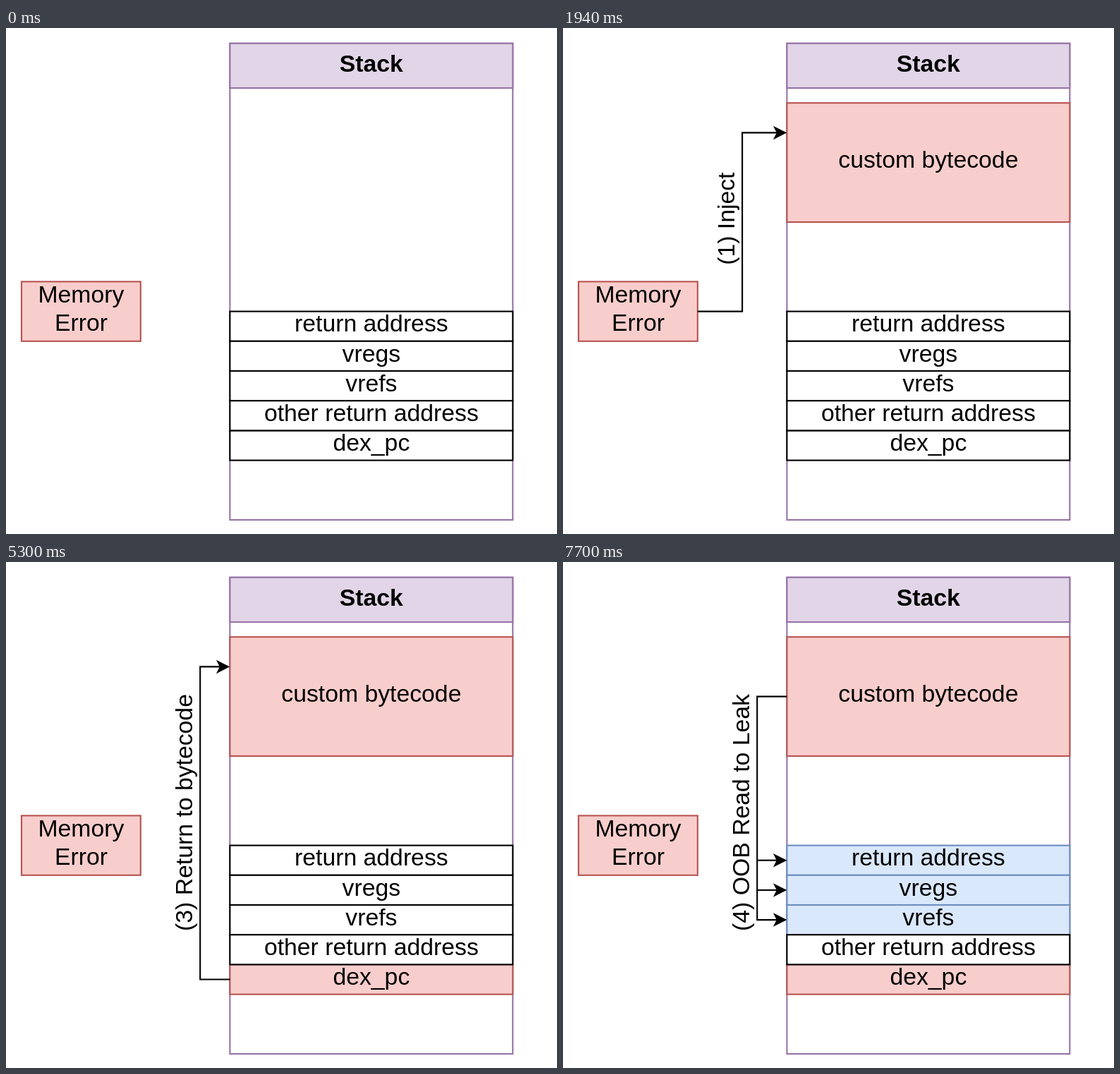
Recreate the animation shown at these times as an HTML page. Size 781 by 717 pixels, loop 8 s.

```html
<!DOCTYPE html>
<html lang="en">
<head>
<meta charset="utf-8">
<style>
  html, body { margin: 0; width: 100%; height: 100%; overflow: hidden; background: #fff; }
  svg { display: block; width: 781px; height: 717px; }
  text { font: 33.76px "Liberation Sans", Arial, Helvetica, sans-serif; text-anchor: middle; }
  .bold { font-weight: bold; }
</style>
</head>
<body>
<svg id="stage" viewBox="0 0 781 717"></svg>
<script>
const U = 21.1, LINE = 2.11;
const gx = n => 22 + n * U;
const gy = n => 21.8 + n * U;

const RED = ["#f8cecc", "#b85450"];
const BLUE = ["#dae8fc", "#6c8ebf"];
const PURPLE = ["#e1d5e7", "#9673a6"];
const PLAIN = ["#fff", "#000"];

const LOOP = 8000;
const STARTS = [0, 500, 2900, 5300, 7700];
const stage = document.getElementById("stage");

function add(tag, attrs, parent = stage) {
  const el = document.createElementNS("http://www.w3.org/2000/svg", tag);
  for (const key in attrs) el.setAttribute(key, attrs[key]);
  parent.appendChild(el);
  return el;
}

function box(x, y, w, h, [fill, stroke]) {
  return add("rect", {
    x: gx(x), y: gy(y), width: w * U, height: h * U,
    fill, stroke, "stroke-width": LINE
  });
}

function label(str, x, y, attrs = {}, parent = stage) {
  add("text", { x, y, ...attrs }, parent).textContent = str;
}

function sideLabel(str, x, y, parent) {
  label(str, 0, 0, { transform: `translate(${x} ${y}) rotate(-90)` }, parent);
}

function line(d, parent) {
  add("path", { d, fill: "none", stroke: "#000", "stroke-width": LINE, "stroke-miterlimit": 10 }, parent);
}

// Arrowhead pointing right at the stack's left edge
function head(y, parent) {
  add("path", {
    d: `M${gx(14) - 2.36} ${y}l-14.77 7.39 3.69 -7.39 -3.69 -7.39z`,
    stroke: "#000", "stroke-width": LINE, "stroke-miterlimit": 10
  }, parent);
}

// Elbow connector from one grid point to the stack edge
function elbow(fromX, fromY, midX, toY, parent) {
  line(`M${gx(fromX)} ${gy(fromY)}H${gx(midX)}V${gy(toY)}H${gx(14) - 11}`, parent);
  head(gy(toY), parent);
}

const midX = gx(23.5);

box(14, 0, 19, 32, ["#fff", PURPLE[1]]);
box(14, 0, 19, 3, PURPLE);
label("Stack", midX, 61.6, { class: "bold" });

box(0, 16, 8, 4, RED);
label("Memory", gx(4), 389.2);
label("Error", gx(4), 429.4);

const names = ["return address", "vregs", "vrefs", "other return address", "dex_pc"];
const rows = [];
// The fourth row's outline lies above its neighbours
for (const i of [0, 1, 2, 4, 3]) rows[i] = box(14, 18 + i * 2, 19, 2, PLAIN);
names.forEach((name, i) => label(name, midX, 430.3 + i * 2 * U));

const code = add("g", {});
code.appendChild(box(14, 4, 19, 8, RED));
label("custom bytecode", midX, 198.4, {}, code);

const steps = STARTS.map(() => add("g", {}));

elbow(8, 18, 11, 6, steps[1]);
sideLabel("(1) Inject", 242.6, 270.2, steps[1]);

elbow(8, 18, 11, 27, steps[2]);
sideLabel("(2) Redirect", 242.6, 500.6, steps[2]);

elbow(14, 27, 12, 6, steps[3]);
sideLabel("(3) Return to bytecode", 263.7, 355, steps[3]);

elbow(14, 8, 12, 23, steps[4]);
for (const y of [19, 21]) {
  line(`M${gx(12)} ${gy(y)}H${gx(14) - 11}`, steps[4]);
  head(gy(y), steps[4]);
}
sideLabel("(4) OOB Read to Leak", 263.7, 355, steps[4]);

function show(el, on) {
  el.setAttribute("visibility", on ? "visible" : "hidden");
}

function paint(row, [fill, stroke]) {
  row.setAttribute("fill", fill);
  row.setAttribute("stroke", stroke);
}

function draw(ms) {
  const t = ms % LOOP;
  const step = STARTS.filter(s => s <= t).length - 1;
  steps.forEach((g, i) => show(g, i === step));
  show(code, step >= 1);
  paint(rows[4], step >= 2 ? RED : PLAIN);
  for (let i = 0; i < 3; i++) paint(rows[i], step >= 4 ? BLUE : PLAIN);
}

let begin = null;
function tick(now) {
  if (begin === null) begin = now;
  draw(Math.max(0, now - begin));
  requestAnimationFrame(tick);
}
draw(0);
requestAnimationFrame(tick);
</script>
</body>
</html>
```
